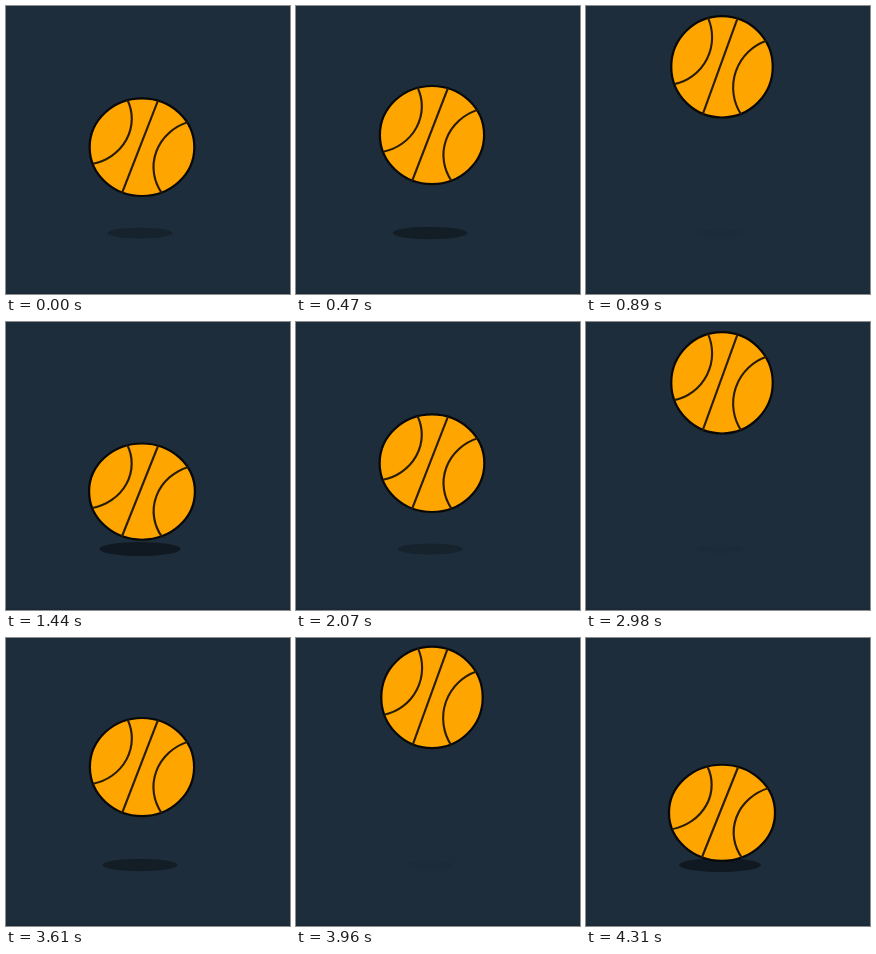
Write an HTML page that moves like this. It is 284 px wide and 288 px high and loops after 4.38 s.

```html
<!DOCTYPE html>
<html lang="en">
<head>
<meta charset="utf-8">
<title>Bouncing ball</title>
<style>
  html, body { margin: 0; width: 100%; height: 100%; overflow: hidden; background: #1d2d3b; }
  svg { display: block; width: 284px; height: 288px; }
</style>
</head>
<body>
<svg viewBox="0 0 284 288">
  <rect width="284" height="288" fill="#1d2d3b"/>
  <rect y="286.5" width="284" height="1.5" fill="#1b2835"/>
  <ellipse id="shadow" cx="134" cy="227"/>
  <g id="ball">
    <circle r="50.7" fill="#ffa500" stroke="#080808" stroke-width="2.2"/>
    <g fill="none" stroke="#2a1d06" stroke-width="2.1">
      <path d="M15.5 -48.5 L-19.3 47.5"/>
      <path d="M-14 -49 A48 48 0 0 1 -47.5 17.3"/>
      <path d="M44.3 -26 A49.5 49.5 0 0 0 19 47.5"/>
    </g>
  </g>
</svg>
<script>
const LOOP = 4380;
const HALF = 7.5;          // steps from the top to the floor
const RADIUS = 51.8;
const TOP = 7.5, DROP = 118.5;
const SHADOW_LAG = 0.34;

const ball = document.getElementById('ball');
const shadow = document.getElementById('shadow');

// The picture moves in steps, slightly slower after the turn.
function stepAt(ms) {
  const turn = 1710, t = ms + 8;
  return Math.floor(t < turn ? t / 68.4 : 25 + (t - turn) / 70.27);
}

// 0 at the top, 1 on the floor; a steep S-curve each way.
function fallen(step) {
  const u = (step + SHADOW_LAG) / HALF + 0.5;
  const half = Math.floor(u);
  const x = (u - half - 0.5) * HALF;
  const s = 1 / (1 + Math.exp(-2.6 * x));
  return half % 2 ? 1 - s : s;
}

function draw(ms) {
  const step = stepAt(ms % LOOP);

  const d = fallen(step);
  const rx = RADIUS + 2.4 * d;
  const ry = RADIUS - 2.8 * d;
  const y = TOP + DROP * d + ry;
  ball.setAttribute('transform',
    `translate(136 ${y}) scale(${rx / RADIUS} ${ry / RADIUS})`);

  const near = fallen(step - SHADOW_LAG);
  const w = 48 + 34 * near;
  shadow.setAttribute('rx', w / 2);
  shadow.setAttribute('ry', w * 0.085);
  shadow.setAttribute('fill-opacity', 0.05 + 0.4 * near);
}

const start = performance.now();
function tick() {
  draw(performance.now() - start);
  requestAnimationFrame(tick);
}
draw(0);
requestAnimationFrame(tick);
</script>
</body>
</html>
```
